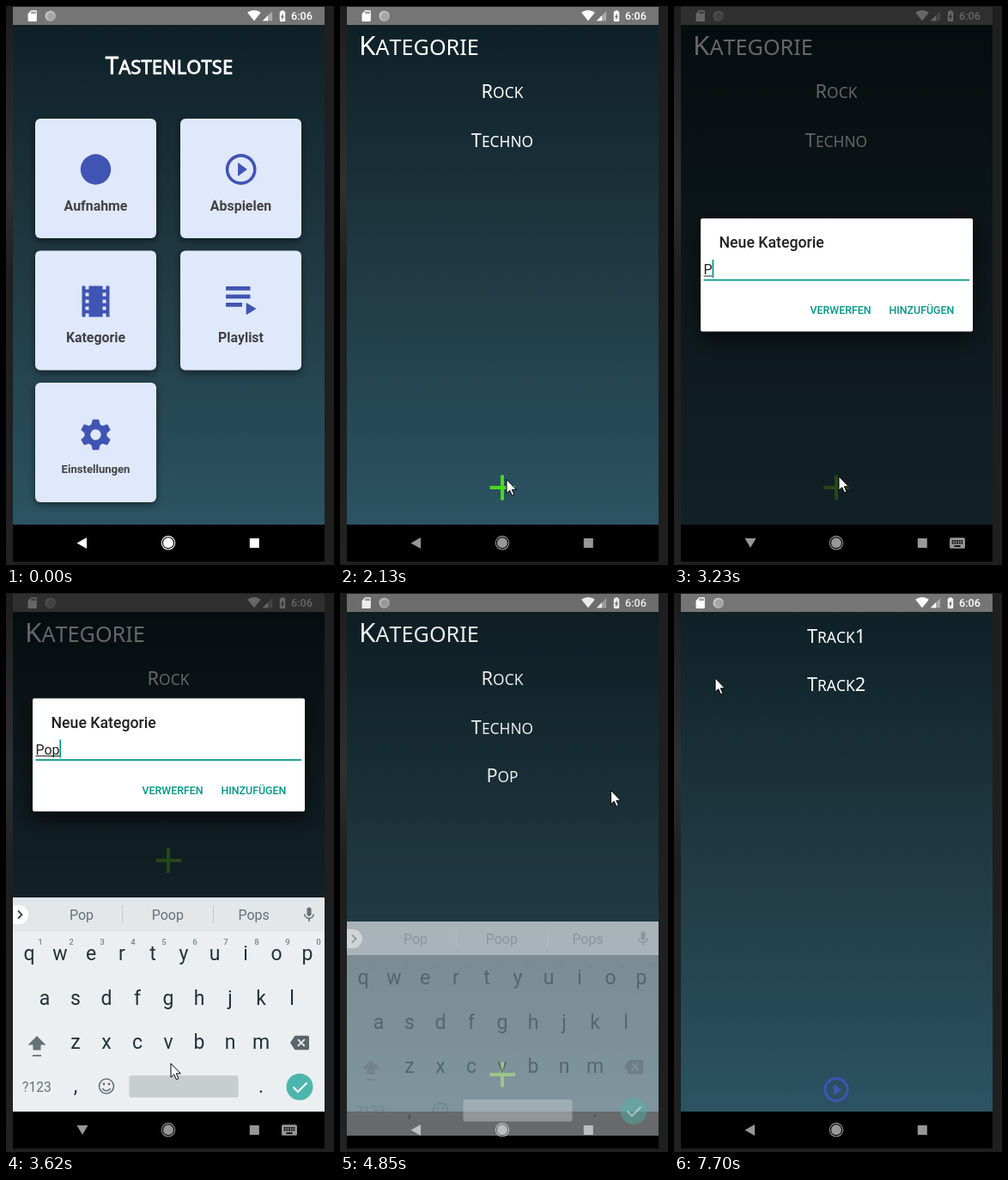
Recreate the animation shown at these times as an HTML page with a canvas. Size 382 by 650 pixels, loop 8 s.

```html
<!DOCTYPE html>
<html lang="de">
<head>
<meta charset="utf-8">
<title>Kategorie anlegen</title>
<style>
html, body { margin: 0; width: 100%; height: 100%; overflow: hidden; background: #1f1f1f; }
canvas { display: block; }
</style>
</head>
<body>
<canvas id="stage" width="382" height="650"></canvas>
<script>
const c = document.getElementById('stage').getContext('2d');
const LOOP = 8000, LEFT = 8, RIGHT = 371, TOP = 22, BOTTOM = 603;
const INDIGO = '#4054b4', TEAL = '#009688';

// Icons on a 24-unit grid
const icons = {
  play: 'M10 16.5l6-4.5-6-4.5v9zM12 2C6.48 2 2 6.48 2 12s4.48 10 10 10 10-4.48 10-10S17.52 2 12 2zm0 18c-4.41 0-8-3.59-8-8s3.59-8 8-8 8 3.59 8 8-3.59 8-8 8z',
  film: 'M18 3v2h-2V3H8v2H6V3H4v18h2v-2h2v2h8v-2h2v2h2V3h-2zM8 17H6v-2h2v2zm0-4H6v-2h2v2zm0-4H6V7h2v2zm10 8h-2v-2h2v2zm0-4h-2v-2h2v2zm0-4h-2V7h2v2z',
  list: 'M4 10h12v2H4zM4 6h12v2H4zM4 14h8v2H4zM14 14v6l5-3z',
  mic: 'M12 14c1.66 0 3-1.34 3-3V5c0-1.66-1.34-3-3-3S9 3.34 9 5v6c0 1.66 1.34 3 3 3zm5.3-3c0 3-2.54 5.1-5.3 5.1S6.7 14 6.7 11H5c0 3.41 2.72 6.23 6 6.72V21h2v-3.28c3.28-.48 6-3.3 6-6.72h-1.7z',
  erase: 'M22 3H7c-.69 0-1.23.35-1.59.88L0 12l5.41 8.11c.36.53.9.89 1.59.89h15c1.1 0 2-.9 2-2V5c0-1.1-.9-2-2-2zm-3 12.59L17.59 17 14 13.41 10.41 17 9 15.59 12.59 12 9 8.41 10.41 7 14 10.59 17.59 7 19 8.41 15.41 12 19 15.59z',
  keys: 'M20 5H4c-1.1 0-2 .9-2 2v10c0 1.1.9 2 2 2h16c1.1 0 2-.9 2-2V7c0-1.1-.9-2-2-2zm-9 3h2v2h-2V8zm0 3h2v2h-2v-2zM8 8h2v2H8V8zm0 3h2v2H8v-2zm-1 2H5v-2h2v2zm0-3H5V8h2v2zm9 7H8v-2h8v2zm0-4h-2v-2h2v2zm0-3h-2V8h2v2zm3 3h-2v-2h2v2zm0-3h-2V8h2v2z',
  card: 'M18 2h-8L4 8v12c0 1.1.9 2 2 2h12c1.1 0 2-.9 2-2V4c0-1.1-.9-2-2-2zm-6 6h-2V4h2v4zm3 0h-2V4h2v4zm3 0h-2V4h2v4z',
  wifi: 'M12 21.5L23.64 7c-.45-.34-4.93-4-11.64-4S.81 6.66.36 7z',
  signal: 'M2 22h20V2z',
  bars: 'M2 22h11V11z',
  battery: 'M15.67 4H14V2h-4v2H8.33C7.6 4 7 4.6 7 5.33v15.33C7 21.4 7.6 22 8.33 22h7.33c.74 0 1.34-.6 1.34-1.33V5.33C17 4.6 16.4 4 15.67 4zM11 20v-5.5H9L13 7v5.5h2L11 20z'
};
for (const k in icons) icons[k] = new Path2D(icons[k]);

const ramp = (t, a, b) => Math.min(1, Math.max(0, (t - a) / (b - a)));
const easeOut = p => 1 - (1 - p) ** 3;

function layer(alpha, dy, draw) {
  if (alpha <= 0) return;
  c.save();
  c.globalAlpha *= alpha;
  c.translate(0, dy);
  draw();
  c.restore();
}
function rect(x, y, w, h, color, r = 0) {
  c.fillStyle = color;
  c.beginPath();
  c.roundRect(x, y, w, h, r);
  c.fill();
}
function disc(x, y, r, color) {
  c.fillStyle = color;
  c.beginPath();
  c.arc(x, y, r, 0, 7);
  c.fill();
}
function shape(d, color) {
  c.fillStyle = color;
  c.fill(new Path2D(d));
}
function line(d, color, width) {
  c.strokeStyle = color;
  c.lineWidth = width;
  c.stroke(new Path2D(d));
}
function icon(name, x, y, size, color) {
  c.save();
  c.translate(x - size / 2, y - size / 2);
  c.scale(size / 24, size / 24);
  c.fillStyle = color;
  c.fill(icons[name]);
  c.restore();
}
function text(s, x, y, size, color, weight = 400, align = 'left') {
  c.font = `${weight} ${size}px Roboto, sans-serif`;
  c.textAlign = align;
  c.fillStyle = color;
  c.fillText(s, x, y);
}
function shadow(blur, dy, alpha, draw) {
  c.save();
  c.shadowColor = `rgba(0,0,0,${alpha})`;
  c.shadowBlur = blur;
  c.shadowOffsetY = dy;
  draw();
  c.restore();
}

// Small caps: lower-case letters become capitals at 80 % size
function caps(s, x, y, size, centered = true, stroke = 0) {
  c.textAlign = 'left';
  c.fillStyle = c.strokeStyle = '#fff';
  c.lineWidth = stroke;
  const font = ch => c.font = `${/[a-z]/.test(ch) ? size * .8 : size}px "Noto Sans", sans-serif`;
  const widths = [...s].map(ch => (font(ch), c.measureText(ch.toUpperCase()).width));
  if (centered) x -= widths.reduce((a, b) => a + b) / 2;
  [...s].forEach((ch, i) => {
    font(ch);
    c.fillText(ch.toUpperCase(), x, y);
    if (stroke) c.strokeText(ch.toUpperCase(), x, y);
    x += widths[i];
  });
}

function backdrop(bottom = BOTTOM) {
  const g = c.createLinearGradient(0, TOP, 0, bottom);
  ['#0f2027', '#203a43', '#2c5364'].forEach((col, i) => g.addColorStop(i / 2, col));
  rect(LEFT, TOP, RIGHT - LEFT, bottom - TOP, g);
}

function gear(x, y) {
  c.save();
  c.translate(x, y);
  c.fillStyle = INDIGO;
  c.beginPath();
  c.arc(0, 0, 13, 0, 7);
  c.arc(0, 0, 6.2, 7, 0, true);
  c.fill();
  for (let i = 0; i < 6; i++) {
    shape('M-5.5-10L-3.8-17.2Q-3.6-17.8-3-17.8H3Q3.6-17.8 3.8-17.2L5.5-10z', INDIGO);
    c.rotate(Math.PI / 3);
  }
  c.restore();
}

function home() {
  backdrop();
  caps('Tastenlotse', 190, 79, 27.6, true, .8);
  ['Aufnahme', 'Abspielen', 'Kategorie', 'Playlist', 'Einstellungen'].forEach((name, i) => {
    const x = 34 + i % 2 * 169, y = 131 + (i >> 1) * 153.5;
    shadow(8, 3, .5, () => rect(x, y, 141, 139, '#e0e8fb', 6));
    text(name, x + 70.5, y + (i < 4 ? 106.5 : 105), i < 4 ? 15.9 : 13.1, '#424242', 700, 'center');
  });
  disc(104.5, 190, 17.7, INDIGO);
  icon('play', 273.7, 190, 43, INDIGO);
  icon('film', 104.5, 343.5, 48, INDIGO);
  icon('list', 275, 340.2, 56.8, INDIGO);
  gear(104.5, 498.5);
}

function category(t) {
  const bottom = t >= 3310 && t < 4770 ? 354 : BOTTOM;
  const green = t < 2450 ? '#4ad81c' : '#62b335';
  backdrop(bottom);
  caps('Kategorie', 22, 56.5, 31.5, false);
  caps('Rock', 189, 107, 21.7);
  caps('Techno', 189, 163.5, 21.7);
  if (t >= 4770) caps('Pop', 189, 220, 21.7);
  rect(187, bottom - 57.5, 4, 29, green);
  rect(174.5, bottom - 45, 29.5, 4, green);
}

function tracks() {
  backdrop();
  caps('Track1', 189, 57.5, 21.7);
  caps('Track2', 189, 114, 21.7);
  icon('play', 189, 577.5, 34.8, INDIGO);
}

function statusBar() {
  rect(LEFT, 1, RIGHT - LEFT, TOP - 1, '#757575');
  icon('card', 30.7, 11.5, 15.5, '#fff');
  disc(51.6, 11.6, 6.2, '#c4c4c4');
  disc(52.4, 12.2, 4.6, '#a5a5a5');
  icon('wifi', 289, 11, 16, '#fff');
  icon('signal', 304.5, 11.5, 13.5, '#a8a8a8');
  icon('bars', 304.5, 11.5, 13.5, '#fff');
  icon('battery', 322, 11.5, 15.5, '#fff');
  text('6:06', 332, 16.3, 12.6, '#fff', 500);
}

function navBar(t) {
  rect(LEFT, BOTTOM, RIGHT - LEFT, 43, '#000');
  const v = Math.round(255 - 104 * ramp(t, 300, 990)), col = `rgb(${v},${v},${v})`;
  const typing = t >= 3230 && t < 4770;
  shape(typing ? 'M82.5 619h13l-6.5 11z' : 'M94 618v13l-11.5-6.5z', col);
  disc(189, 624.3, 6, col);
  c.beginPath();
  c.arc(189, 624.3, 7.7, 0, 7);
  c.strokeStyle = col;
  c.lineWidth = 1.1;
  c.stroke();
  rect(283.8, 619, 11, 11, col, .5);
  if (typing) icon('keys', 330, 624.5, 21.5, col);
}

function dialog(t) {
  shadow(22, 9, .6, () => rect(31, 247, 317, 131.5, '#fff', 2));
  text('Neue Kategorie', 52.5, 281, 17.7, '#212121', 500);
  const typed = 'Pop'.slice(0, [3230, 3390, 3540].filter(k => t >= k).length);
  text(typed, 34.5, 312, 15.9, '#212121');
  const w = c.measureText(typed).width;
  if (typed) rect(34.5, 313.5, w, 1, '#212121');
  const caret = t < 2910 || t >= 3230 && t < 4040 || t >= 4540;
  if (caret) rect(34.5 + w, 295, 1.7, 21, TEAL);
  rect(34.5, 317.8, 309.5, 1.8, TEAL);
  text('VERWERFEN', 158.5, 358, 12.4, TEAL, 500);
  text('HINZUFÜGEN', 250.5, 358, 12.4, TEAL, 500);
}

function keyboard() {
  const dark = '#20323a', grey = '#647177';
  rect(LEFT, 354, RIGHT - LEFT, 249, '#eceff1');
  rect(LEFT, 354, RIGHT - LEFT, 39, '#e3e7e9');
  rect(LEFT, 363, 18, 22, '#fff', [0, 11, 11, 0]);
  line('M14 369.5l4.5 4.5-4.5 4.5', '#37474f', 1.8);
  ['Pop', 'Poop', 'Pops'].forEach((s, i) => text(s, 88 + i * 100.3, 380, 16, grey, 400, 'center'));
  rect(135, 363, 1, 21, '#c3c9cc');
  rect(241, 363, 1, 21, '#c3c9cc');
  icon('mic', 353, 374, 20.5, grey);

  ['qwertyuiop', 'asdfghjkl', 'zxcvbnm'].forEach((row, r) =>
    [...row].forEach((ch, i) => {
      const x = 27 + r * 18 + (r > 1 ? 18 : 0) + i * 36;
      text(ch, x, 427 + r * 51.7, 23, dark, 400, 'center');
      if (!r) text((i + 1) % 10, x + 13, 409, 9.7, '#78858b', 500, 'center');
    }));

  shape('M36 515l10.5 10.5h-6v6h-9v-6h-6z', grey);
  rect(31, 537, 10, 1.8, grey);
  icon('erase', 342, 523, 22, '#59666c');
  text('?123', 36, 579.5, 15.7, grey, 400, 'center');
  text(',', 81, 581, 23, dark, 400, 'center');
  text('.', 297, 581, 23, dark, 400, 'center');
  line('M125.5 573.5a8.5 8.5 0 1 0-17 0a8.5 8.5 0 1 0 17 0M112.5 576a5 5 0 0 0 9 0', grey, 1.6);
  disc(114, 571, 1.4, grey);
  disc(120, 571, 1.4, grey);
  rect(143.5, 561, 127, 25.5, '#c8cdd0', 2);
  disc(342, 574.3, 15.5, '#4db6ac');
  line('M334.5 574.5l5.5 5.5 10.5-10.5', '#fff', 2.1);
}

// Pointer stops: time, x, y
const stops = [
  [300, 150, 655], [760, 112, 333], [1540, 112, 333], [1980, 181, 531], [2130, 193.5, 550],
  [2450, 193.5, 550], [2590, 191.5, 546.5], [3930, 191.5, 546.5], [4300, 323, 153], [4550, 315, 229],
  [4930, 315, 229], [5460, 222, 152], [5540, 219, 152], [5690, 203, 150], [5840, 202, 150],
  [7180, 202, 150], [7620, 50, 101], [7700, 47.5, 98.5]
];
function pointer(t) {
  if (t < 300) return;
  const i = stops.findLastIndex(s => t >= s[0]), a = stops[i], b = stops[i + 1] || a;
  const p = a === b ? 0 : ramp(t, a[0], b[0]);
  c.save();
  c.translate(a[1] + (b[1] - a[1]) * p, a[2] + (b[2] - a[2]) * p);
  const arrow = 'M.5.5V16.6L4.2 13.2 6.9 19.2 9.4 18.1 6.8 12.3H11.8z';
  shape(arrow, '#fff');
  line(arrow, '#000', 1);
  c.restore();
}

function page(t, start, draw) {
  const p = ramp(t, start, start + 330);
  layer(Math.min(1, p * 1.6), 48 * (1 - easeOut(p)), draw);
}

function frame(now) {
  const t = now % LOOP;
  const side = c.createLinearGradient(0, 0, 0, 650);
  side.addColorStop(0, '#1d1d1d');
  side.addColorStop(.32, '#303030');
  side.addColorStop(.48, '#1f1f1f');
  side.addColorStop(1, '#222');
  rect(0, 0, 382, 650, '#1f1f1f');
  rect(0, 0, LEFT, 650, side);
  rect(LEFT, 1, RIGHT - LEFT, 645, '#000');

  if (t < 1540) home();
  if (t >= 1210 && t < 7180) page(t, 1210, () => category(t));
  if (t >= 6850) page(t, 6850, tracks);
  statusBar();

  const dim = .6 * (ramp(t, 2420, 2590) - ramp(t, 4690, 4875));
  layer(dim, 0, () => rect(LEFT, 1, RIGHT - LEFT, BOTTOM - 1, '#000'));
  navBar(t);
  layer(ramp(t, 2420, 2590) - ramp(t, 4690, 4800), -124.5 * easeOut(ramp(t, 3300, 3500)), () => dialog(t));

  const shown = easeOut(ramp(t, 3240, 3470)) - ramp(t, 4760, 4922);
  layer(shown, 50 * (1 - shown), keyboard);
  pointer(t);
}

const begin = performance.now();
(function loop() {
  frame(performance.now() - begin);
  requestAnimationFrame(loop);
})();
</script>
</body>
</html>
```
